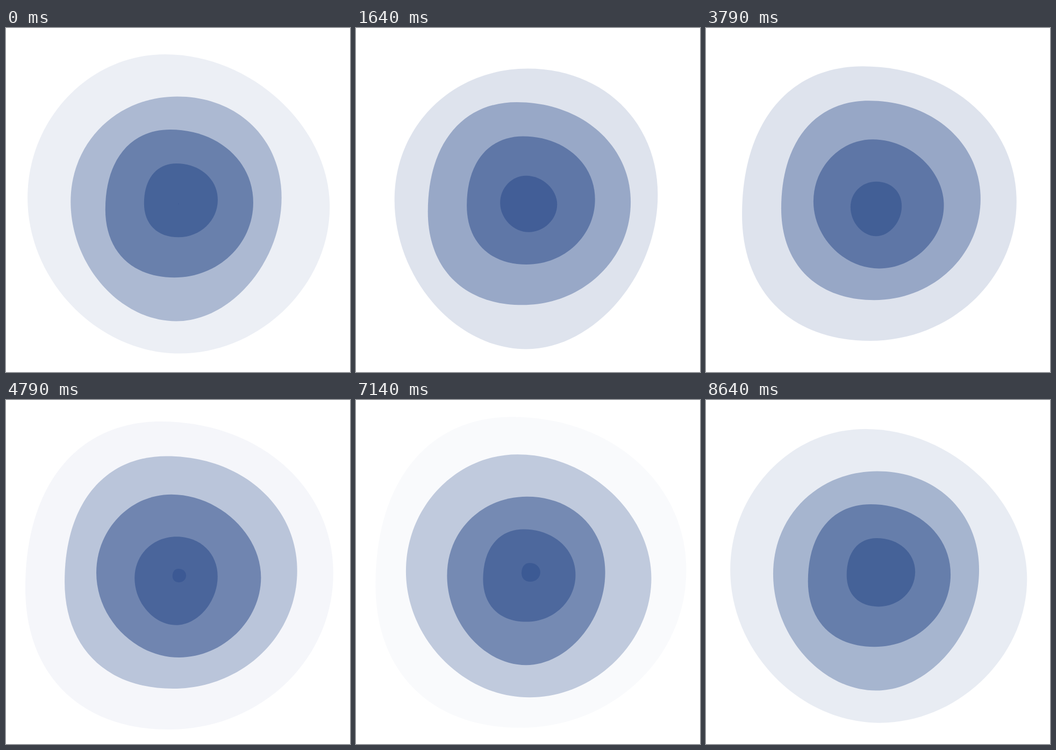
Recreate the animation shown at these times as an HTML page. Size 640 by 640 pixels, loop 8710 ms.

```html
<!DOCTYPE html>
<html lang="en">
<head>
<meta charset="utf-8">
<title>Pulsing blobs</title>
<style>
  html, body { margin: 0; width: 100%; height: 100%; overflow: hidden; background: #fff; }
  svg { display: block; width: 100%; height: 100%; }
  path { fill: #3b5993; }
</style>
</head>
<body>
<svg id="stage" viewBox="0 0 640 640"></svg>
<script>
const LOOP = 8710;            // ms
const TICK = 1000 / 14;       // ms per drawn step
const SPACING = 30.8;         // ticks between two births
const HEAD_START = 0.3;       // ticks of growth at birth
const LIFE = 134.3;           // ticks until fully faded

// Outlines in a box from -1 to 1. lean: where the curve touches the left, top,
// right and bottom side; bulge: roundness of the quarter that follows each.
const round = { lean: [-0.04, -0.09, 0.02, 0.006], bulge: [0.55, 0.525, 0.535, 0.535] };
const egg = { lean: [-0.065, 0.011, -0.1, 0], bulge: [0.565, 0.58, 0.52, 0.53] };
const pebble = { lean: [0.08, -0.123, -0.014, -0.068], bulge: [0.615, 0.57, 0.555, 0.615] };

// growth: width and height gained per tick.
const kinds = [
  { outline: round, centre: [321.2, 327.3], growth: [4.552, 4.507] },
  { outline: egg, centre: [316.5, 336.5], growth: [4.233, 4.51] },
  { outline: pebble, centre: [322.4, 326.6], growth: [4.445, 4.445] },
  { outline: pebble, centre: [325.4, 320.7], growth: [4.41, 4.41] }
];

function pathOf({ lean: [left, top, right, bottom], bulge }) {
  const points = [[-1, left], [top, -1], [1, right], [bottom, 1]];
  return points.reduce((d, [x0, y0], i) => {
    const [x1, y1] = points[(i + 1) % 4];
    const dx = (x1 - x0) * bulge[i], dy = (y1 - y0) * bulge[i];
    const handles = i % 2
      ? [x0 + dx, y0, x1, y1 - dy]
      : [x0, y0 + dy, x1 - dx, y1];
    return `${d}C${handles} ${x1} ${y1}`;
  }, `M${points[0]}`) + 'Z';
}

// Eases down to MIDDLE by half of the life, then falls evenly to nothing.
const MIDDLE = 0.58;
function opacityAt(life) {
  return life < 0.5
    ? MIDDLE + (1 - MIDDLE) * (1 - 2 * life) ** 1.6
    : MIDDLE * 2 * (1 - life);
}

const stage = document.getElementById('stage');
const blobs = [];
for (let i = -4; i < 4; i++) {
  const kind = kinds[(i + 4) % 4];
  const el = document.createElementNS(stage.namespaceURI, 'path');
  el.setAttribute('d', pathOf(kind.outline));
  stage.append(el);
  blobs.push({ el, birth: i * SPACING, ...kind });
}

function draw(ms) {
  const tick = Math.floor((ms % LOOP + 5) / TICK);
  for (const { el, birth, centre, growth } of blobs) {
    const age = tick - birth;
    const alive = age >= 0 && age < LIFE;
    el.setAttribute('visibility', alive ? 'visible' : 'hidden');
    if (!alive) continue;
    const scale = growth.map(rate => rate / 2 * (age + HEAD_START));
    el.setAttribute('transform', `translate(${centre}) scale(${scale})`);
    el.setAttribute('fill-opacity', opacityAt(age / LIFE));
  }
}

const start = performance.now();
function loop() {
  draw(performance.now() - start);
  requestAnimationFrame(loop);
}
loop();
</script>
</body>
</html>
```
